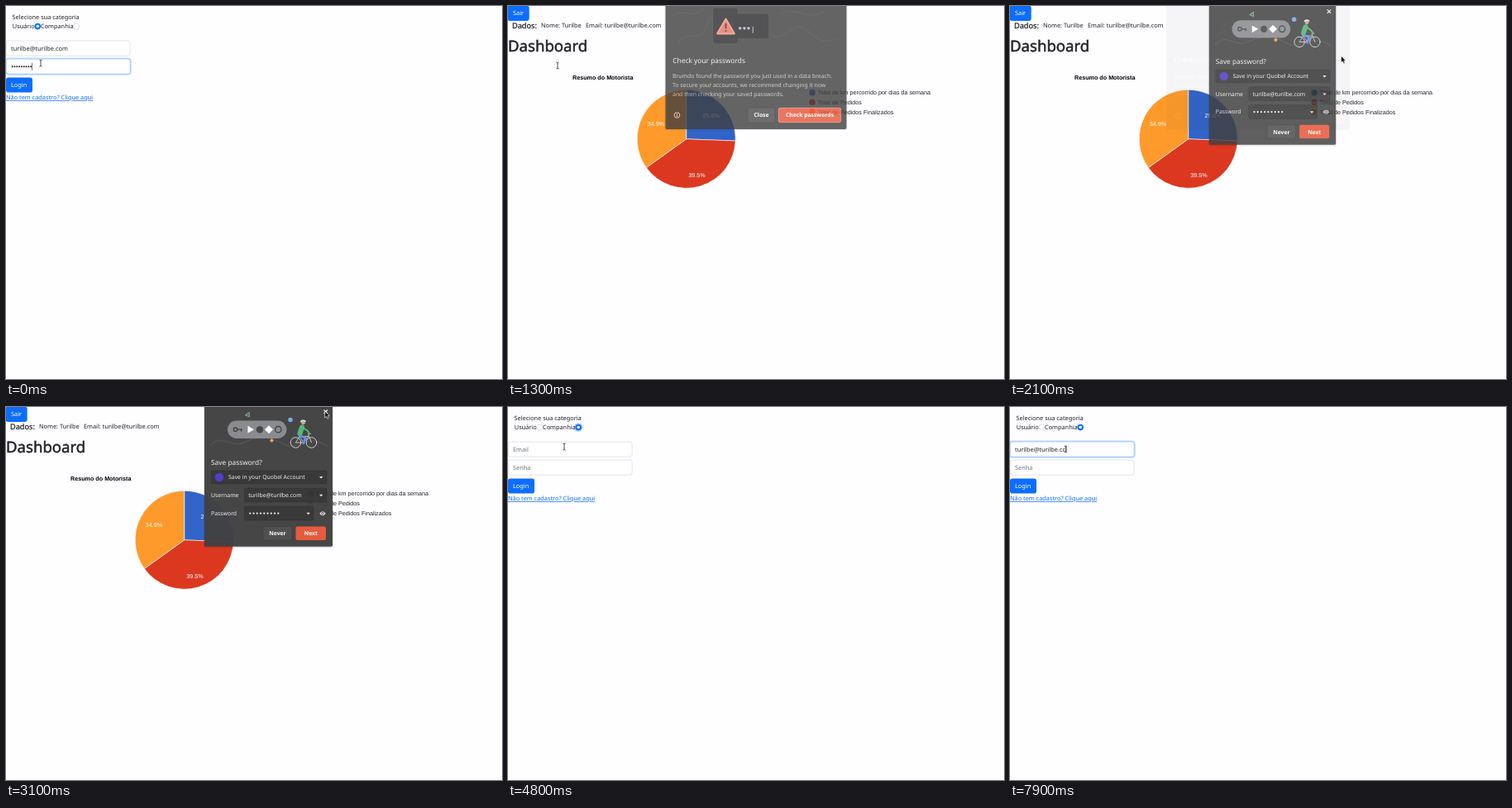
These frames come from a looping animation (600 by 451 pixels, 8000 ms). An HTML page:

```html
<!DOCTYPE html>
<html lang="pt">
<head>
<meta charset="utf-8">
<title>Login</title>
<style>
html, body { margin: 0; width: 100%; height: 100%; overflow: hidden; background: #fefdff; }
svg { display: block; }
text { font: 7.35px "Noto Sans", sans-serif; fill: #212529; white-space: pre; text-rendering: geometricPrecision; }
.medium { stroke: #212529; }
.chart text { font: 7.2px "Liberation Sans", Arial, sans-serif; }
.chart .pct { fill: #fff; text-anchor: middle; }
.chart .title { font-weight: 700; fill: #000; }
.hint { fill: #6c757d; }
.light { fill: #fff; }
.dialog text { font-size: 6.88px; fill: #eee; }
.dialog .head { font-size: 8.36px; }
.dialog .soft { fill: #c4c4c4; }
.dialog .btn { font-weight: 600; font-size: 6.8px; text-anchor: middle; fill: #fff; }
.box { fill: #333; stroke: #2a2a2a; stroke-width: .5; }
.key { fill: #4b4b4b; stroke: #303030; stroke-width: .5; }
.go { fill: #e75537; }
</style>
</head>
<body>
<svg width="600" height="451" viewBox="0 0 600 451">
  <rect width="600" height="451" fill="#fefdff"/>

  <g id="login">
    <text x="7.5" y="15.7">Selecione sua categoria</text>
    <text x="7.8" y="27.2">Usuário</text>
    <text x="42" y="27.2">Companhia</text>
    <g id="radios"></g>
    <g id="fields"></g>
    <text id="mail" x="6" y="53.6"></text>
    <text id="pass" x="6" y="75.7" class="hint">Senha</text>
    <g id="dots"></g>
    <rect id="caret" width=".6" height="9" fill="#212529"/>
    <rect id="loginRing" x="-1.9" y="84.6" width="35.8" height="21.8" rx="4.5" fill="#0d6efd" opacity=".4"/>
    <rect id="loginBtn" y="86.5" width="32" height="18" rx="2.8"/>
    <text x="6" y="98.1" class="light">Login</text>
    <text x="0" y="113.2" style="fill:#0d6efd;text-decoration:underline">Não tem cadastro? Clique aqui</text>
  </g>

  <g id="dash">
    <rect id="exit" x="-.3" y="-.4" width="26" height="18.3" rx="2.8"/>
    <text x="6" y="11.4" class="light">Sair</text>
    <text x="5" y="27" class="medium" style="font-size:9.2px;stroke-width:.25">Dados:</text>
    <text id="who" x="40" y="26.3"></text>
    <text id="whoMail" x="94" y="26.3"></text>
    <text x="0" y="55.4" class="medium" style="font-size:18.6px;stroke-width:.5">Dashboard</text>
    <g id="chart" class="chart">
      <text x="78" y="88.7" class="title">Resumo do Motorista</text>
    </g>
  </g>

  <g id="check" class="dialog">
    <rect x="189.500" y="-8" width="221" height="158.500" rx="3" fill="#000" opacity=".1"/>
    <rect x="190.500" y="-8" width="219" height="157" rx="2" fill="#3f3f3f"/>
    <g fill="none" stroke="#474747" stroke-width="1.200">
      <path d="M205 46C214 28 229 44 237 30S244 12 250 10M316 34C334 46 344 16 360 28S378 46 398 40"/>
      <path d="M198 12C210 2 222 16 236 4M330 10C344 -2 362 20 384 6"/>
    </g>
    <rect x="247.500" y="2" width="31" height="44" rx="3" fill="#2c2c2e" stroke="#505050" stroke-width=".7"/>
    <rect x="275" y="9.500" width="40" height="29.500" rx="1.500" fill="#29292b"/>
    <text x="278.500" y="30.500" style="font-size:8px;font-weight:700;letter-spacing:.8px;fill:#d3def5">***|</text>
    <path d="M263.500 15.500L274 33.500H253Z" fill="#e8705f" stroke="#f0998c" stroke-width="1.800" stroke-linejoin="round"/>
    <path d="M263.500 21v6.500M263.500 29.300v1.600" stroke="#222" stroke-width="1.500"/>
    <text x="199.300" y="68.500" class="head">Check your passwords</text>
    <text x="199" y="87.400" class="soft">Brumdo found the password you just used in a data breach.</text>
    <text x="199" y="98.200" class="soft">To secure your accounts, we recommend changing it now</text>
    <text x="199" y="109" class="soft">and then checking your saved passwords.</text>
    <circle cx="204.500" cy="132" r="3.300" fill="none" stroke="#eee" stroke-width=".9"/>
    <path d="M204.500 130v.9M204.500 131.600v2.400" stroke="#eee"/>
    <rect class="key" x="290" y="123" width="33" height="18" rx="2"/>
    <text x="306.500" y="134.500" class="btn">Close</text>
    <rect class="go" x="327.300" y="123.300" width="75.400" height="17.400" rx="2" stroke="#f2957f" stroke-width=".8"/>
    <text x="365" y="134.500" class="btn">Check passwords</text>
  </g>

  <g id="save" class="dialog">
    <rect x="239" y="-8" width="157" height="178.300" rx="3" fill="#000" opacity=".13"/>
    <rect x="240" y="-8" width="155" height="176.800" rx="2" fill="#414141"/>
    <path d="M247 47C262 30 272 52 290 42S320 36 336 45S366 30 389 48" fill="none" stroke="#4e4e4e" stroke-width="1.500"/>
    <rect x="268" y="16.500" width="71.500" height="21.500" rx="10.700" fill="#87888c"/>
    <g fill="none" stroke="#3c3c3c" stroke-width="1.300">
      <circle cx="277.500" cy="27.200" r="2.200"/>
      <path d="M279.800 27.200H286M284.500 27.200v2.500"/>
      <circle cx="329.300" cy="27.200" r="3.700"/>
    </g>
    <path d="M292.500 22.800L300 27.200L292.500 31.600Z" fill="#fff"/>
    <circle cx="307" cy="27.200" r="4.200" fill="#444"/>
    <path d="M318 22.200L323 27.200L318 32.200L313 27.200Z" fill="#fff"/>
    <path d="M289.800 9.800L294 6.800L294.300 11.500Z" fill="none" stroke="#6fae8a" stroke-width="1.200"/>
    <circle cx="344" cy="15.500" r="2.700" fill="#7aa7f0"/>
    <path d="M321.500 38L324 40.500L321.500 43L319 40.500Z" fill="#f2a04c"/>
    <g fill="none" stroke-linecap="round" stroke-linejoin="round">
      <g stroke="#c9cacc">
        <circle cx="350.500" cy="43" r="6.300"/>
        <circle cx="369.500" cy="43" r="6.300"/>
        <path d="M350.500 43L355 35.500H366L360 43H350.500M360 43L355 35.500M369.500 43L365.500 32.500H368.500" stroke-width=".9"/>
      </g>
      <path d="M355 34.500L362 37L360 44" stroke="#5b8def" stroke-width="2.600"/>
      <path d="M358 24.500L355.500 32" stroke="#4fb477" stroke-width="6"/>
      <path d="M359 25L364.500 28.500L367 32" stroke="#4fb477" stroke-width="2"/>
      <circle cx="359.500" cy="19.300" r="1.800" fill="#d9a184" stroke="#d9a184"/>
      <path d="M357 17.500Q359 15.500 362 17.200" stroke="#e8e8e8" stroke-width="1.800"/>
    </g>
    <path d="M384.500 3.500L389 8M389 3.500L384.500 8" stroke="#f4f4f4" stroke-width="1.200"/>
    <text x="248" y="69.500" class="head">Save password?</text>
    <rect class="box" x="248" y="77" width="140" height="15.800" rx="1.500"/>
    <circle cx="258" cy="85" r="5.200" fill="#4b39c6"/>
    <text x="269" y="87.400">Save in your Quobel Account</text>
    <text x="248" y="109">Username</text>
    <rect class="box" x="288.500" y="98" width="99.500" height="17" rx="1.500"/>
    <text id="saveMail" x="293.300" y="109"></text>
    <text x="248" y="131">Password</text>
    <rect class="box" x="288.500" y="120" width="83.500" height="17" rx="1.500"/>
    <g id="saveDots"></g>
    <path d="M379 84h4.400l-2.200 2.500zM379 105.700h4.400l-2.200 2.500zM363.500 127.700h4.400l-2.200 2.500z" fill="#eee"/>
    <path d="M379.300 128.700Q383 123.700 386.700 128.700Q383 133.700 379.300 128.700Z" fill="#eee"/>
    <circle cx="383" cy="128.700" r="1.400" fill="#eee" stroke="#333" stroke-width=".8"/>
    <rect class="key" x="311" y="144.500" width="35" height="16.500" rx="2"/>
    <text x="328.500" y="155.300" class="btn">Never</text>
    <rect class="go" x="350.500" y="144.500" width="36.500" height="16.500" rx="2"/>
    <text x="368.800" y="155.300" class="btn">Next</text>
  </g>

  <g id="mouse">
    <g id="beam" fill="none">
      <path d="M-1.600 -4Q0 -4 0 -3V3Q0 4 -1.600 4M1.600 -4Q0 -4 0 -3M0 3Q0 4 1.600 4" stroke="#fff" stroke-width="1.600"/>
      <path d="M-1.600 -4Q0 -4 0 -3V3Q0 4 -1.600 4M1.600 -4Q0 -4 0 -3M0 3Q0 4 1.600 4" stroke="#222" stroke-width=".8"/>
    </g>
    <path id="arrow" d="M0 0V8L1.900 6.300L3.200 9.200L4.700 8.500L3.400 5.700H5.800Z" fill="#111" stroke="#fff" stroke-width=".6"/>
    <path id="hand" d="M-.7 .7Q0 -.4 .7 .7V3.600Q1.700 2.800 2.300 3.800Q3.200 3.100 3.800 4.200Q5 3.800 4.800 5.400L4 9H-.6Q-1.400 7.300 -2.500 5.900Q-2.200 4.700 -.7 6Z" fill="#fff" stroke="#222" stroke-width=".7"/>
  </g>
</svg>
<script>
const LOOP = 8000, STEP = 100;
const NAME = "Turilbe", MAIL = "turilbe@turilbe.com";
const BLUE = "#0d6efd", DARK = "#0b5ed7";
const $ = id => document.getElementById(id);

function add(parent, tag, attrs, text) {
  const el = document.createElementNS("http://www.w3.org/2000/svg", tag);
  for (const k in attrs) el.setAttribute(k, attrs[k]);
  if (text) el.textContent = text;
  return parent.appendChild(el);
}
const show = (el, on) => { el.style.display = on ? "" : "none"; };

// form controls
const radios = [38.3, 85.2].map(cx => {
  const g = $("radios"), at = { cx, cy: 24.6 };
  return {
    glow: add(g, "circle", { ...at, r: 5.3, fill: BLUE, opacity: .3 }),
    disc: add(g, "circle", { ...at, r: 3.6, "stroke-width": .5 }),
    dot: add(g, "circle", { ...at, r: 1.75, fill: "#fff" })
  };
});
const fields = [42, 64].map(y => ({
  glow: add($("fields"), "rect", { x: -1.6, y: y - 1.6, width: 153.4, height: 21.4, rx: 4.4, fill: "#c2dbff" }),
  box: add($("fields"), "rect", { x: .2, y: y + .1, width: 149.9, height: 18, rx: 2.8, fill: "#fff", "stroke-width": .6 })
}));
for (let i = 0; i < 9; i++) {
  add($("dots"), "circle", { cx: 7.6 + i * 2.83, cy: 73.2, r: 1, fill: "#212529" });
  add($("saveDots"), "circle", { cx: 295.3 + i * 4.25, cy: 128.6, r: 1.15, fill: "#eee" });
}

// pie chart and legend
const CX = 215.7, CY = 160.8, R = 59.5;
const slices = [
  [25.6, "#3164c8", "Total de km percorrido por dias da semana", 245.6, 134.6],
  [39.5, "#db381f", "Total de Pedidos", 228.5, 206.6],
  [34.9, "#fe9a2b", "Total de Pedidos Finalizados", 179, 145]
];
let sum = 0;
slices.forEach(([pct, fill, label, lx, ly], i) => {
  const rim = p => {
    const a = p / 100 * 2 * Math.PI;
    return (CX + R * Math.sin(a)) + " " + (CY - R * Math.cos(a));
  };
  const d = `M${CX} ${CY}L${rim(sum)}A${R} ${R} 0 0 1 ${rim(sum += pct)}Z`;
  add($("chart"), "path", { d, fill, stroke: "#fff", "stroke-width": .6 });
  add($("chart"), "text", { x: lx, y: ly, class: "pct" }, pct + "%");
  const y = 104.8 + i * 11.6;
  add($("chart"), "circle", { cx: 368.1, cy: y, r: 3.7, fill });
  add($("chart"), "text", { x: 374.8, y: y + 2.6 }, label);
});

$("who").textContent = "Nome: " + NAME;
$("whoMail").textContent = "Email: " + MAIL;
$("saveMail").textContent = MAIL;

// time, x, y, pointer shape
const path = [
  [0, 42, 69, "beam"], [100, 31, 83, "beam"], [200, 17, 98, "hand"], [500, 17, 98, "hand"],
  [700, 22, 95, "arrow"], [1300, 60, 72, "beam"], [1500, 46, 76, "arrow"], [1800, 306, 131, "arrow"],
  [1900, 306, 131, "arrow"], [2100, 400.5, 60.5, "arrow"], [2400, 425, 66, "arrow"],
  [2900, 385.7, 5, "arrow"], [3100, 385.7, 5, "arrow"], [3700, 110, 55, "arrow"],
  [4000, 33.5, 24.5, "hand"], [4200, 14, 11, "hand"], [4300, 14, 11, "arrow"],
  [4600, 85, 24, "arrow"], [4700, 85, 24, "arrow"], [4800, 68, 48, "beam"],
  [5000, 67.3, 51, "beam"], [LOOP, 67.3, 51, "beam"]
];
const checkFade = [[1100, 0], [1200, .45], [1300, .8], [1400, 1], [1900, 1], [2000, .4], [2100, .04], [2200, 0]];
const saveFade = [[1900, 0], [2000, .45], [2100, .84], [2200, 1], [3000, 1], [3100, .97], [3200, .4], [3300, 0]];

const strokes = [5500];
for (let t = 5700; t <= 6200; t += 100) strokes.push(t);
strokes.push(6400);
for (let t = 6800; t <= 7400; t += 100) strokes.push(t);
strokes.push(7600, 7900, 7900);

function sample(keys, t, ease = u => u) {
  if (t <= keys[0][0]) return keys[0].slice(1);
  const i = keys.findIndex(k => k[0] > t);
  if (i < 0) return keys[keys.length - 1].slice(1);
  const a = keys[i - 1], b = keys[i], u = ease((t - a[0]) / (b[0] - a[0]));
  return a.slice(1).map((v, j) => typeof v === "number" ? v + (b[j + 1] - v) * u : v);
}
const smooth = u => u * u * (3 - 2 * u);

// dialogs grow while they open, but only fade when they close
function fadeDialog(id, keys, t, cx, cy, full) {
  const [a] = sample(keys, t);
  const opened = keys.find(k => k[1] === 1)[0];
  const s = full * (t < opened ? .93 + .07 * a : 1);
  show($(id), a > 0);
  $(id).setAttribute("opacity", a);
  $(id).setAttribute("transform", `translate(${cx} ${cy}) scale(${s}) translate(${-cx} ${-cy})`);
}

function drawLogin(t) {
  const first = t < 400;
  const picked = first ? 0 : t >= 4700 ? 1 : -1;
  const focus = first ? (t < 200 ? 1 : -1) : t >= 5000 ? 0 : -1;
  const typed = first ? MAIL : MAIL.slice(0, strokes.filter(s => s <= t).length);

  radios.forEach((r, i) => {
    const on = i === picked;
    show(r.glow, on && !first && t < 5000);
    show(r.dot, on);
    r.disc.setAttribute("fill", on ? BLUE : "#fff");
    r.disc.setAttribute("stroke", on ? BLUE : "#bfbfbf");
  });
  fields.forEach((f, i) => {
    show(f.glow, i === focus);
    f.box.setAttribute("stroke", i === focus ? "#86b7fe" : "#ced4da");
  });
  const mail = $("mail");
  mail.textContent = typed || "Email";
  mail.setAttribute("class", typed ? "" : "hint");
  show($("dots"), first);
  show($("pass"), !first);

  show($("caret"), focus >= 0);
  $("caret").setAttribute("x", focus ? 31.3 : 6 + (typed ? mail.getComputedTextLength() : 0));
  $("caret").setAttribute("y", focus ? 68.7 : 46.6);

  const pressed = first && t >= 200;
  show($("loginRing"), pressed);
  $("loginBtn").setAttribute("fill", pressed ? DARK : BLUE);
}

function render(t) {
  const inside = t >= 400 && t < 4300;
  show($("login"), !inside);
  show($("dash"), inside);
  if (!inside) drawLogin(t);
  show($("chart"), t >= 700);
  $("exit").setAttribute("fill", t >= 3900 ? DARK : BLUE);
  fadeDialog("check", checkFade, t, 300, 75, 1.014);
  fadeDialog("save", saveFade, t, 317, 85, 1);

  const [x, y, shape] = sample(path, t, smooth);
  $("mouse").setAttribute("transform", `translate(${x} ${y})`);
  for (const id of ["beam", "arrow", "hand"]) show($(id), id === shape);
}

const start = performance.now();
function tick() {
  const t = (performance.now() - start) % LOOP;
  render(Math.floor(t / STEP) * STEP);
  requestAnimationFrame(tick);
}
tick();
</script>
</body>
</html>
```
